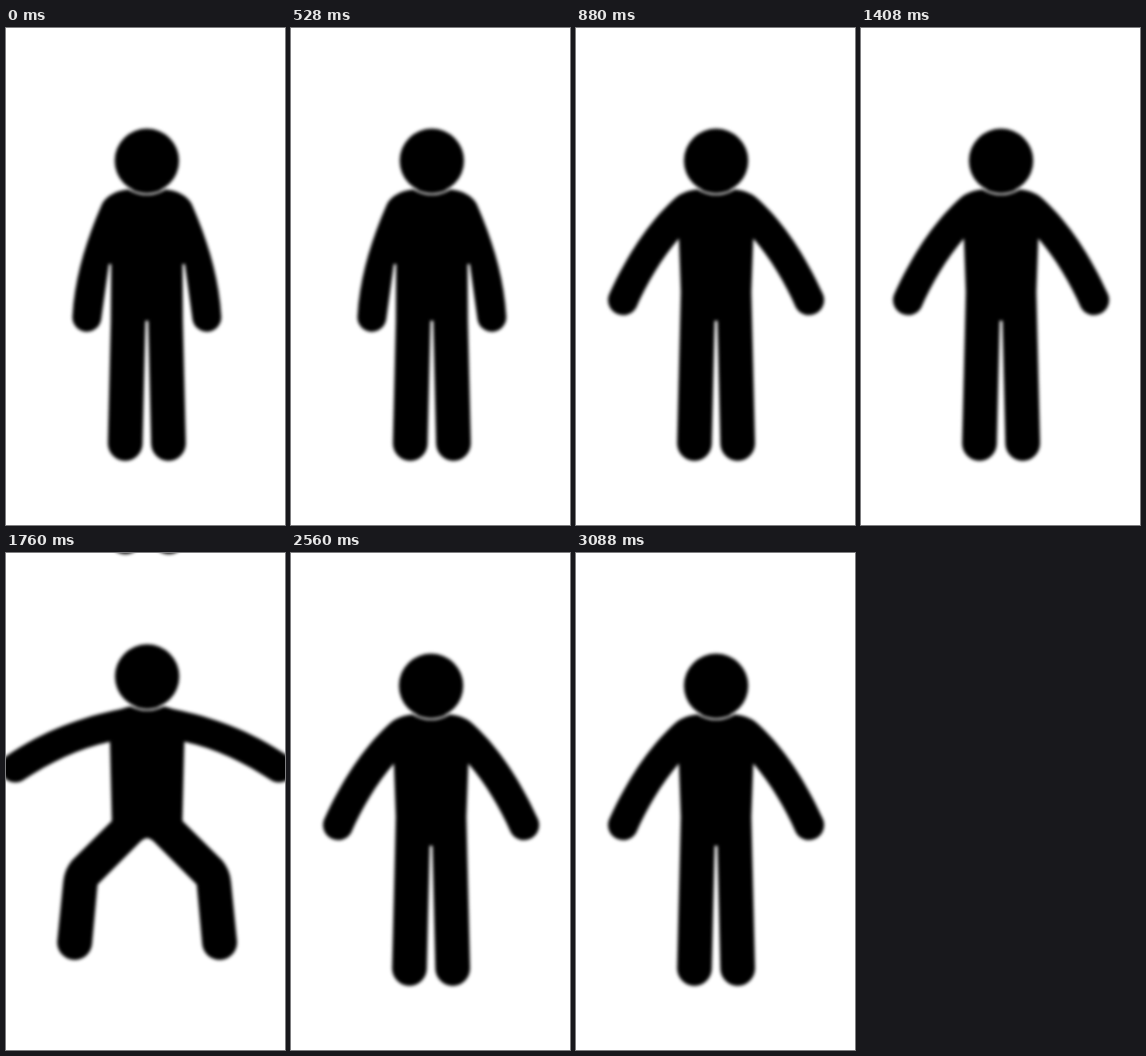
Recreate the animation shown at these times as an HTML page. Size 360x640 px, loop 3440 ms.

```html
<!DOCTYPE html>
<html lang="en">
<head>
<meta charset="utf-8">
<title>Jumping figure</title>
<style>
  html, body { margin: 0; width: 100%; height: 100%; overflow: hidden; background: #fff; }
  svg { display: block; width: 100vw; height: 100vh; }
  .pose { visibility: hidden; animation: 3440ms step-end infinite; }
  .stand { animation-name: stand; }
  .lift { animation-name: lift; }
  .jump { animation-name: jump; }
  .neck { fill: none; stroke: #fff; stroke-width: 2; }
  @keyframes stand {
    0% { visibility: visible; }
    25.5814%, 100% { visibility: hidden; }
  }
  @keyframes lift {
    0% { visibility: hidden; }
    25.5814% { visibility: visible; }
    51.1628% { visibility: hidden; }
    74.4186%, 100% { visibility: visible; }
  }
  @keyframes jump {
    0% { visibility: hidden; }
    51.1628% { visibility: visible; }
    74.4186%, 100% { visibility: hidden; }
  }
</style>
</head>
<body>
<svg viewBox="0 0 360 640">
  <defs>
    <filter id="soft" filterUnits="userSpaceOnUse" x="-40" y="-60" width="440" height="760" color-interpolation-filters="sRGB">
      <feGaussianBlur stdDeviation="1.9"/>
    </filter>
    <g id="head">
      <circle r="41.5"/>
      <path class="neck" d="M-23 36.3A43 43 0 0 0 23 36.3"/>
    </g>
    <!-- Left halves, mirrored about x = 0 -->
    <path id="standHalf" d="M1 208H-24C-40 209 -53 217 -58 227C-76 268 -93 318 -96 371A18.7 18.7 0 0 0 -59 376L-49 304H-46L-46.500 378L-50.300 535A22.400 22.400 0 0 0 -5.500 535L-1.800 377H1Z"/>
    <path id="liftHalf" d="M1 208H-24C-38 209 -48 214 -56 222C-88 252 -114 291 -138 343A19.500 19.500 0 0 0 -103 360C-89 328 -71 298 -48 271L-45.500 340L-50.300 535A22.400 22.400 0 0 0 -5.500 535L-1.800 377H1Z"/>
    <path id="jumpHalf" d="M1 198H-24L-34 201C-84 211 -134 229 -181 261A19 19 0 0 0 -161.500 293.500C-124 269 -89 252 -48 243L-45.500 345L-97 396Q-107 408 -108.300 424L-116 500A22.500 22.500 0 0 0 -71 503L-64 427L-8 371Q-3 367 1 367Z"/>
  </defs>
  <g filter="url(#soft)">
    <g class="pose stand" transform="translate(181.75)">
      <use href="#standHalf"/>
      <use href="#standHalf" transform="scale(-1 1)"/>
      <use href="#head" y="171"/>
    </g>
    <g class="pose lift" transform="translate(180.75)">
      <use href="#liftHalf"/>
      <use href="#liftHalf" transform="scale(-1 1)"/>
      <use href="#head" y="171"/>
    </g>
    <g class="pose jump" transform="translate(182.1)">
      <use href="#jumpHalf"/>
      <use href="#jumpHalf" transform="scale(-1 1)"/>
      <use href="#head" y="159"/>
      <circle cx="-28" cy="-21" r="22.4"/>
      <circle cx="28" cy="-21" r="22.4"/>
    </g>
  </g>
</svg>
</body>
</html>
```
